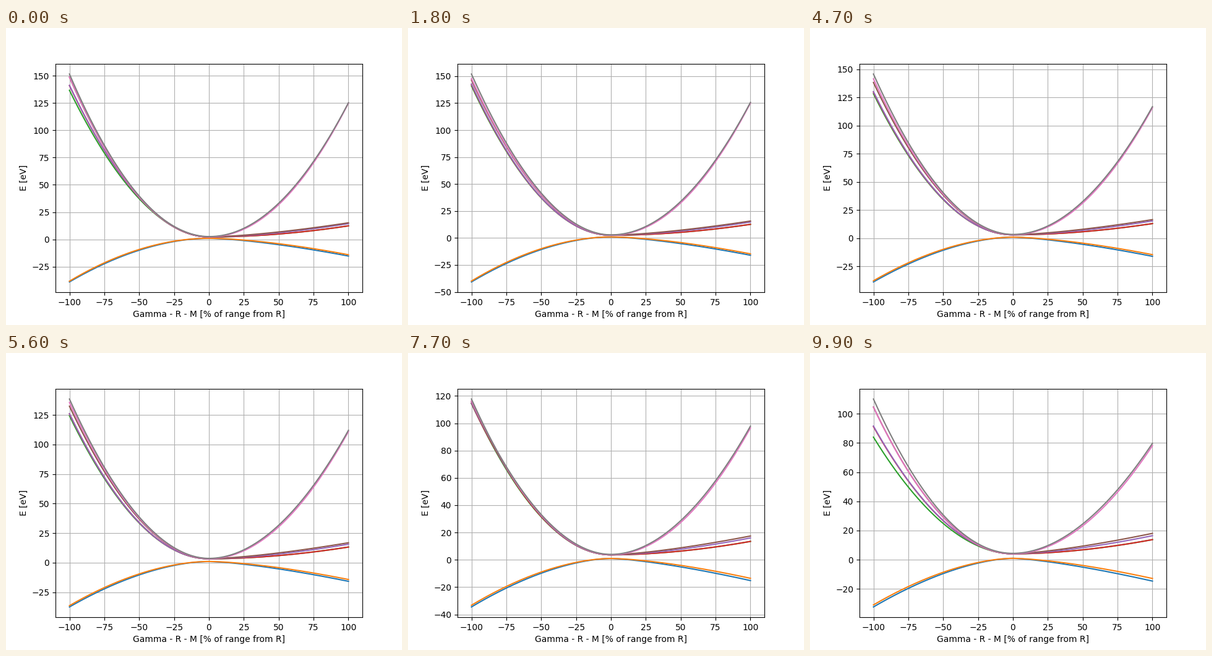
Write a matplotlib script that moves like this. It is 640 px wide and 480 px high and loops after 10000 ms.

```python
import numpy as np
import matplotlib.pyplot as plt
from matplotlib.animation import FuncAnimation

FRAMES, STEP = 100, 100  # count, ms

x = np.linspace(-1, 1, 201)
k = np.abs(x)


def drift(s, start, end, bow=0, skew=0):
    """Go from start to end as s runs 0..1, bulging by a (skewed) bow."""
    return start + (end - start) * s + s * (1 - s) * (bow + skew * s)


def band(mid, end, power):
    return mid + (end - mid) * k ** power


def bands(s):
    base = drift(s, 2.2, 4.05)

    # Gamma side: three slow and three fast conduction levels that cross
    slow = [drift(s, 151.6, 110.1, -9),
            drift(s, 148.7, 104.6, 2),
            drift(s, 148.9, 104.6, 9)]
    fast = [drift(s, 136.7, 91.6, 180, -122),
            drift(s, 141.0, 91.2, 105, -45),
            drift(s, 141.2, 84.0, 117, -15)]
    upper = np.sort([band(base, e, 2) for e in slow]
                    + [band(base, e, 1.94) for e in fast], axis=0)
    low = drift(s, -39.04, -32.3) - 25 * s * (1 - s) ** 2.2
    valence = [band(1, low, 1.87 - 0.2 * s),
               band(1, low + drift(s, 0.7, 1.4), 1.94 - 0.2 * s)]
    left = np.vstack([valence, upper])

    # M side: (level at R, level at M, exponent)
    low = drift(s, -15.3, -14.6, -6.5, 5)
    top = drift(s, 125.3, 79.8, 62, -20)
    red = drift(s, 12.4, 13.8)
    right = np.array([band(mid, end, power - 0.1 * s) for mid, end, power in [
        (1, low, 1.47),
        (1, low + drift(s, 1.2, 1.8), 1.6),
        (base, red, 1.92),
        (base, red, 1.92),
        (base, drift(s, 14.4, 16.5), 1.66),
        (base, drift(s, 15.2, 18.1), 1.5),
        (base, top - drift(s, 0.4, 1.6), 2.05),
        (base, top, 2.0),
    ]])

    energy = np.where(x < 0, left, right)
    energy[-1] += 0.35 * (1 - k)  # the top band stays split off at R
    return energy


fig, ax = plt.subplots(figsize=(6.4, 4.8), dpi=100)
lines = ax.plot(100 * x, bands(0).T)
ax.set_xlabel("Gamma - R - M [% of range from R]")
ax.set_ylabel("E [eV]")
ax.grid(True)


def update(frame):
    for line, energy in zip(lines, bands(frame / (FRAMES - 1))):
        line.set_ydata(energy)
    ax.relim()
    ax.autoscale_view()
    return lines


anim = FuncAnimation(fig, update, frames=FRAMES, interval=STEP,
                     repeat=True, repeat_delay=0, blit=False)
plt.show()
```
